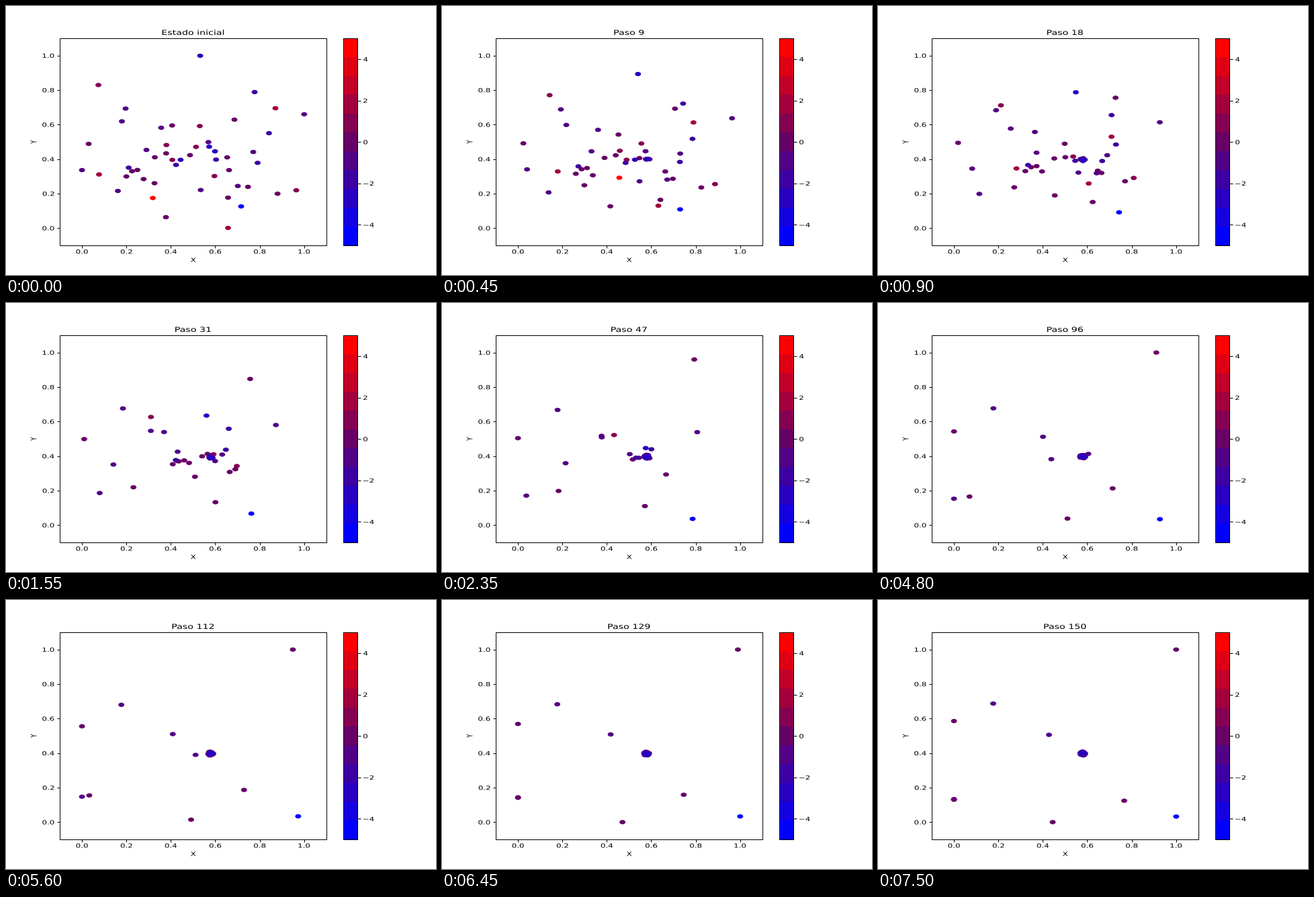
These frames come from a looping animation (640x400 px, 7.55 s). A matplotlib script:

```python
import numpy as np
import matplotlib.pyplot as plt
from matplotlib.animation import FuncAnimation
from matplotlib.collections import EllipseCollection
from matplotlib.patches import PathPatch, Rectangle
from matplotlib.textpath import TextPath
from matplotlib.transforms import Affine2D

STEPS = 151
W, H = 640, 400
SX, SY = 0.853, 0.615          # the whole plot is squashed to the stage
PT = 100 / 72
LEFT, RIGHT, TOP, BOTTOM = 80, 477, 48, 356
BAR_L, BAR_R = 502, 523
HUB = np.array([304.5, 228.5])  # centre of the clump
WALL_LOW, WALL_HIGH = (113.1, 73.7), (443.8, 330.3)
TURN = 47                      # step at which the drifters settle on a course

# Drifters: charge, then start, position at TURN and heading point
# (possibly behind a wall, where they slide along it).
DRIFT = [
    (-1, (178, 152.5), (172, 159), (171.5, 154)),
    (0, (123, 205), (113, 201), (113, 180)),
    (-1, (166.5, 275), (125.5, 286.5), (28, 296)),
    (-1, (231, 181), (237.5, 197.5), (254.5, 200.5)),
    (0, (221, 263.5), (173.5, 279.5), (95, 297)),
    (0, (340, 169), (375.5, 84), (457, -120)),
    (0, (332, 244), (333.5, 255), (366.5, 298.5)),
    (0, (330.5, 285), (302, 302), (260, 341)),
    (-5, (350, 298), (373, 321), (471, 322)),
]
# Outlying dots that fall into the clump: charge and start.
OUTER = [
    (5, (218.5, 285.5)), (2, (138.5, 250.5)), (2, (401, 152)),
    (2, (330.5, 330)), (1, (137.5, 117.5)), (1, (432, 274)),
    (0, (238, 314)), (-2, (370, 128)), (-3, (289, 74)),
    (-1, (172.5, 171.5)), (-1, (113, 244)), (-1, (444, 161)),
]
INNER = 29

rng = np.random.default_rng(11)
steps = np.arange(STEPS)


def charge_color(q):
    return (np.interp(q, (-5, 0, 5), (0, 0.4, 1)), 0,
            np.interp(q, (-5, 0, 5), (1, 0.4, 0)))


def drift(points):
    xs, ys = zip(*points)
    keys = (0, TURN, STEPS - 1)
    return np.column_stack([np.interp(steps, keys, xs), np.interp(steps, keys, ys)])


def fall(q, start):
    """Straight to the hub, slowest for charge -1, then swarm around it."""
    start = np.array(start)
    pace = 0.66 / (1 + 0.5 * abs(q + 1))
    arrive = pace * np.hypot(*(HUB - start))
    part = np.clip(steps / arrive, 0, 1)[:, None]
    angle = rng.uniform(-0.6, 0.6) * steps + rng.uniform(0, 2 * np.pi)
    size = np.clip((steps - arrive) / 6, 0, 1) * rng.uniform(0.4, 1)
    swarm = size[:, None] * np.column_stack([4 * np.cos(angle), 3 * np.sin(angle)])
    return start + (HUB - start) * part + swarm


def inner_dot():
    q = int(np.clip(np.rint(rng.normal(-0.7, 1.4)), -3, 2))
    return q, (rng.uniform(175, 405), np.clip(rng.normal(232, 34), 165, 300))


inner = sorted((inner_dot() for _ in range(INNER)), reverse=True)
fallers = OUTER + inner
charges = [q for q, _ in fallers] + [row[0] for row in DRIFT]
paths = np.stack([fall(*dot) for dot in fallers]
                 + [drift(row[1:]) for row in DRIFT], axis=1)
paths = np.clip(paths, WALL_LOW, WALL_HIGH)

fig = plt.figure(figsize=(W / 100, H / 100), dpi=100, facecolor="white")
ax = fig.add_axes([0, 0, 1, 1])
ax.set_xlim(0, W)
ax.set_ylim(H, 0)
ax.axis("off")


def text_path(s, x, y, pt, ha="center", turn=0):
    """Squashed text outline; y is the baseline, or the centre if turned."""
    path = TextPath((0, 0), s, size=pt * PT, prop={"family": "DejaVu Sans"})
    path = path.transformed(Affine2D().rotate_deg(turn).scale(SX, -SY))
    box = path.get_extents()
    anchor = {"left": box.x0, "right": box.x1, "center": (box.x0 + box.x1) / 2}[ha]
    dy = y - (box.y0 + box.y1) / 2 if turn else y
    return path.transformed(Affine2D().translate(x - anchor, dy))


def label(*args, **kw):
    patch = PathPatch(text_path(*args, **kw), facecolor="black", lw=0)
    return ax.add_patch(patch)


def line(x0, y0, x1, y1):
    ax.plot((x0, x1), (y0, y1), color="black", lw=0.72, solid_capstyle="butt")


def frame(x0, x1):
    ax.add_patch(Rectangle((x0, TOP), x1 - x0, BOTTOM - TOP,
                           fill=False, ec="black", lw=0.72, zorder=4))


band = (BOTTOM - TOP) / 11
for i in range(11):
    ax.add_patch(Rectangle((BAR_L, BOTTOM - (i + 1) * band), BAR_R - BAR_L, band,
                           color=charge_color(i - 5), lw=0, antialiased=False))
frame(LEFT, RIGHT)
frame(BAR_L, BAR_R)

for i in range(6):
    name = f"{i * 0.2:.1f}"
    x, y = 113.1 + 66.13 * i, 330.3 - 51.33 * i
    line(x, BOTTOM, x, BOTTOM + 4)
    label(name, x, 368.3, 10)
    line(LEFT - 4, y, LEFT, y)
    label(name, 71.5, y + 3.3, 10, ha="right")
for v in range(-4, 5, 2):
    y = 202.2 - 30.8 * v
    line(BAR_R, y, BAR_R + 5, y)
    label(str(v).replace("-", "\u2212"), 532, y + 3.3, 10, ha="left")
label("X", 278.7, 380.6, 10)
label("Y", 41, 202, 10, turn=90)
title = label("Estado inicial", 278.4, 43, 12)

count = len(charges)
cloud = EllipseCollection([8.9] * count, [6.4] * count, [0] * count,
                          units="xy", offsets=paths[0], offset_transform=ax.transData,
                          facecolors=[charge_color(q) for q in charges],
                          linewidths=0, zorder=3)
ax.add_collection(cloud, autolim=False)


def update(step):
    cloud.set_offsets(paths[step])
    name = f"Paso {step}" if step else "Estado inicial"
    title.set_path(text_path(name, 278.4, 43, 12))
    return cloud, title


anim = FuncAnimation(fig, update, frames=STEPS, interval=50, repeat=True,
                     repeat_delay=0, blit=False)
plt.show()
```
